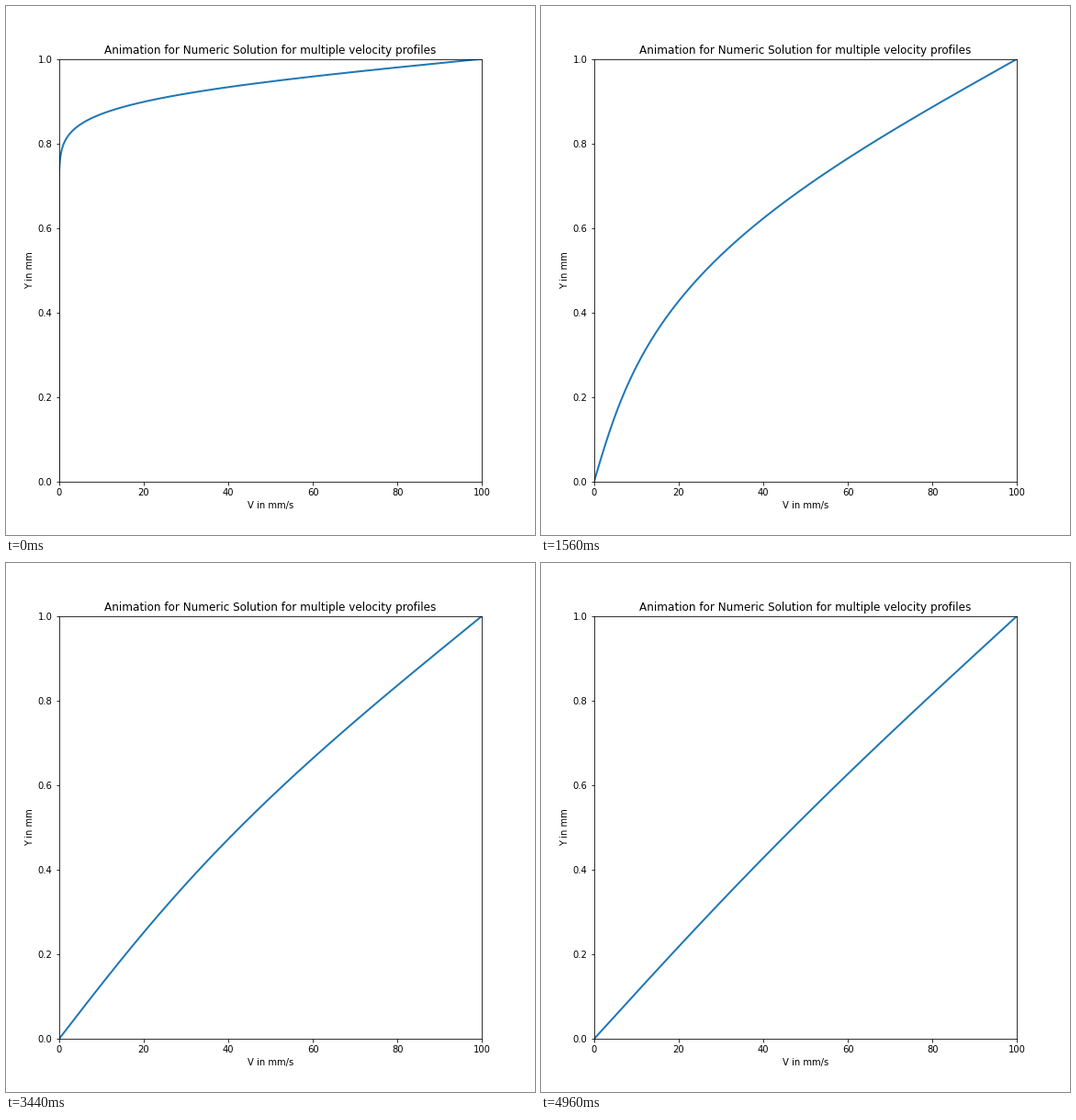
These frames come from a looping animation (576 by 576 pixels, 5000 ms). A matplotlib script:

```python
import numpy as np
import matplotlib.pyplot as plt
from matplotlib.animation import FuncAnimation

plt.rcParams["font.family"] = "DejaVu Sans"

WALL_SPEED = 100    # mm/s, upper plate
TIME_STEP = 0.00314  # dimensionless diffusion time per profile
TICKS = 125
TICK_MS = 40

y = np.linspace(0, 1, 201)
modes = np.arange(1, 61)
sines = np.sin(np.pi * np.outer(y, modes))
weights = 2 * (-1.0) ** modes / (np.pi * modes)


def profile(tau):
    """Velocity between a fixed plate and a suddenly moved one."""
    decay = np.exp(-(modes * np.pi) ** 2 * tau)
    return WALL_SPEED * (y + sines @ (weights * decay))


fig = plt.figure(figsize=(8, 8), dpi=72, facecolor="white")
ax = fig.add_axes([0.1, 0.1, 0.8, 0.8])
ax.set(xlim=(0, WALL_SPEED), ylim=(0, 1), xlabel="V in mm/s", ylabel="Y in mm")
ax.set_title("Animation for Numeric Solution for multiple velocity profiles")
line, = ax.plot([], [], color="#1f77b4", lw=2)


def update(tick):
    # 100 profiles spread over 125 ticks: every fifth tick holds
    step = (4 * tick + 1) // 5
    line.set_data(profile(TIME_STEP * (step + 1)), y)
    return line,


anim = FuncAnimation(fig, update, frames=TICKS, interval=TICK_MS, repeat=True)
plt.show()
```
